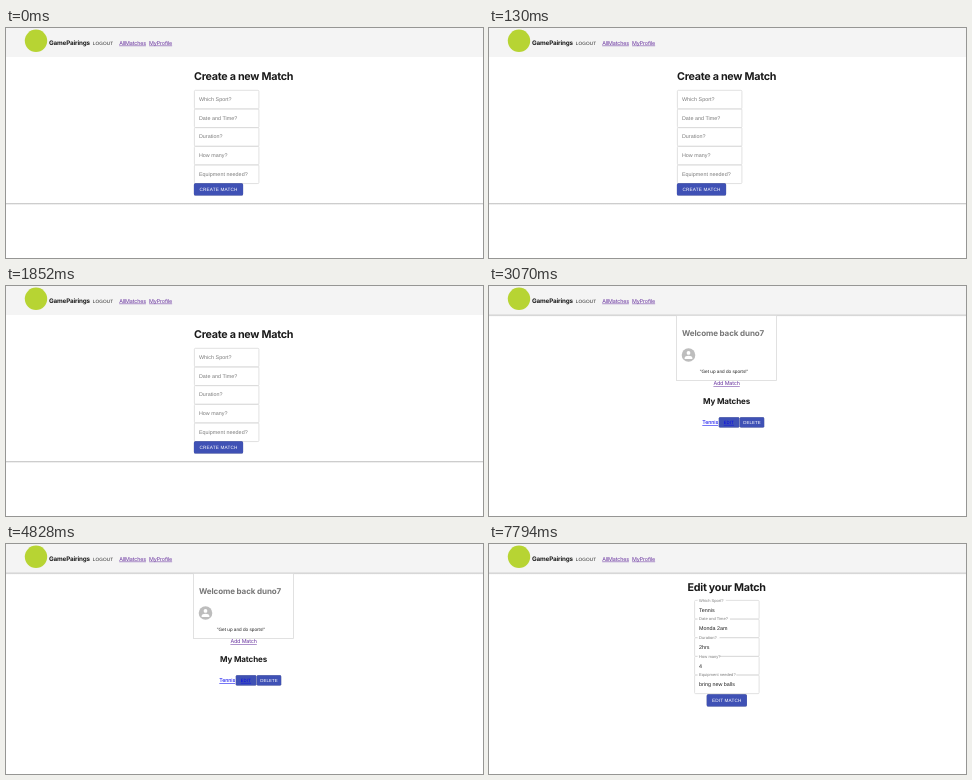
Animation of 477 by 230 pixels, one loop 8.99 s. Source, as an HTML page:

```html
<!DOCTYPE html>
<html lang="en">
<head>
<meta charset="utf-8">
<title>Match planner</title>
<style>
  html, body { margin: 0; width: 100%; height: 100%; overflow: hidden; background: #fff; }
  svg { display: block; width: 100vw; height: 100vh; }
  text { text-rendering: geometricPrecision; font: 5.37px "Liberation Sans", Arial, sans-serif; fill: #222; }
  .mid { text-anchor: middle; }
  .h1, .h2, .h3, .link { font-family: Inter, sans-serif; letter-spacing: -.024em; }
  .h1, .h2, .h3 { font-weight: 700; fill: #1a1a1a; }
  .h1 { font-size: 10.72px; }
  .h2 { font-size: 8.04px; letter-spacing: -.015em; }
  .h3 { font-size: 6.27px; }
  .link { fill: #6a35a0; text-decoration: underline .5px; }
  .fresh { fill: #0000ee; }
  .grey { fill: #777; }
  .btn { font-size: 4.69px; letter-spacing: .028em; }
  .small { font-size: 4.36px; }
  .white { fill: #fff; }
  .quote { font-size: 4.69px; }
  .hint { fill: #7c7c7c; letter-spacing: .009em; }
  .tiny { font-size: 4.03px; }
  .box { fill: none; stroke: #dadada; stroke-width: .8; }
  .blue { fill: #3f51b5; filter: drop-shadow(0 .4px .6px rgba(0, 0, 0, .4)); }

  .view { visibility: hidden; animation: 8.99s step-end infinite; }
  #create { animation-name: first; }
  #profile { animation-name: second; }
  #edit { animation-name: third; }
  @keyframes first { 0% { visibility: visible } 33.3704%, 100% { visibility: hidden } }
  @keyframes second { 0% { visibility: hidden } 33.3704% { visibility: visible } 66.7408%, 100% { visibility: hidden } }
  @keyframes third { 0% { visibility: hidden } 66.7408%, 100% { visibility: visible } }
</style>
</head>
<body>
<svg viewBox="0 0 477 230" preserveAspectRatio="none">
  <defs>
    <linearGradient id="fade" x2="0" y2="1">
      <stop stop-color="#bcbcbc"/>
      <stop offset="1" stop-color="#fff"/>
    </linearGradient>
    <rect id="edge" width="477" height="2" fill="url(#fade)"/>
  </defs>

  <rect width="477" height="29" fill="#f4f4f4"/>
  <circle cx="30" cy="12.8" r="11.2" fill="#b7d433"/>
  <text class="h3" x="43" y="16.9">GamePairings</text>
  <text class="btn" x="86.7" y="16.5">LOGOUT</text>
  <text class="link" x="113.2" y="16.6">AllMatches</text>
  <text class="link" x="143.1" y="16.6">MyProfile</text>

  <g id="create" class="view">
    <use href="#edge" y="175"/>
    <text class="h1" x="188" y="52">Create a new Match</text>
    <g class="fields"></g>
    <rect class="blue" x="187.9" y="155.3" width="49.2" height="12.3" rx="1.5"/>
    <text class="btn white mid" x="212.5" y="163.2">CREATE MATCH</text>
  </g>

  <g id="profile" class="view">
    <use href="#edge" y="28.7"/>
    <rect class="box" x="187.5" y="29.5" width="100" height="65" style="fill:#fff"/>
    <text class="h2 grey" x="193" y="50.4">Welcome back duno7</text>
    <circle cx="199.5" cy="69" r="6.8" fill="#bdbdbd"/>
    <circle cx="199.5" cy="66.9" r="1.9" fill="#fff"/>
    <path d="M195.6 72.9v-.8c0-3 7.8-3 7.8 0v.8z" fill="#fff"/>
    <text class="quote mid" x="235" y="87.4">"Get up and do sports!"</text>
    <text class="link mid" x="237.6" y="99.4">Add Match</text>
    <text class="h2 mid" x="237.5" y="118">My Matches</text>
    <text class="link fresh" x="213.3" y="138">Tennis</text>
    <rect class="blue" x="229.8" y="131.3" width="20.6" height="10.2" rx="1.3"/>
    <rect class="blue" x="250.8" y="131.3" width="24.4" height="10.2" rx="1.3"/>
    <text class="btn small link fresh mid" x="239.9" y="137.9">EDIT</text>
    <text class="btn small white mid" x="263" y="137.9">DELETE</text>
  </g>

  <g id="edit" class="view">
    <use href="#edge" y="28.7"/>
    <text class="h1 mid" x="237.6" y="46.8">Edit your Match</text>
    <g class="fields"></g>
    <rect class="blue" x="217.7" y="150.2" width="40.2" height="12.3" rx="1.5"/>
    <text class="btn white mid" x="237.8" y="158.1">EDIT MATCH</text>
  </g>
</svg>
<script>
  const labels = ["Which Sport?", "Date and Time?", "Duration?", "How many?", "Equipment needed?"];
  const values = ["Tennis", "Monda 2am", "2hrs", "4", "bring new balls"];
  const rowHeight = 18.65;

  function add(parent, tag, attrs, text = "") {
    const node = document.createElementNS("http://www.w3.org/2000/svg", tag);
    for (const name in attrs) node.setAttribute(name, attrs[name]);
    node.textContent = text;
    parent.append(node);
  }

  function addFields(view, x, top, filled) {
    const group = document.querySelector(view + " .fields");
    const rowTop = i => top + i * rowHeight;
    labels.forEach((label, i) => {
      add(group, "rect", { class: "box", x, y: rowTop(i), width: 64.5, height: rowHeight, rx: 1 });
    });
    labels.forEach((label, i) => {
      const y = rowTop(i);
      if (!filled) {
        add(group, "text", { class: "hint", x: x + 4.5, y: y + 10.7 }, label);
        return;
      }
      // the outline is open behind a raised label
      add(group, "rect", { x: x + 3, y: y - 1, width: label.length * 2.1 + 3, height: 2, fill: "#fff" });
      add(group, "text", { class: "hint tiny", x: x + 4.5, y: y + 1.4 }, label);
      add(group, "text", { x: x + 4.5, y: y + 11.4 }, values[i]);
    });
  }

  addFields("#create", 188.4, 62.3, false);
  addFields("#edit", 205.6, 56.4, true);
</script>
</body>
</html>
```
